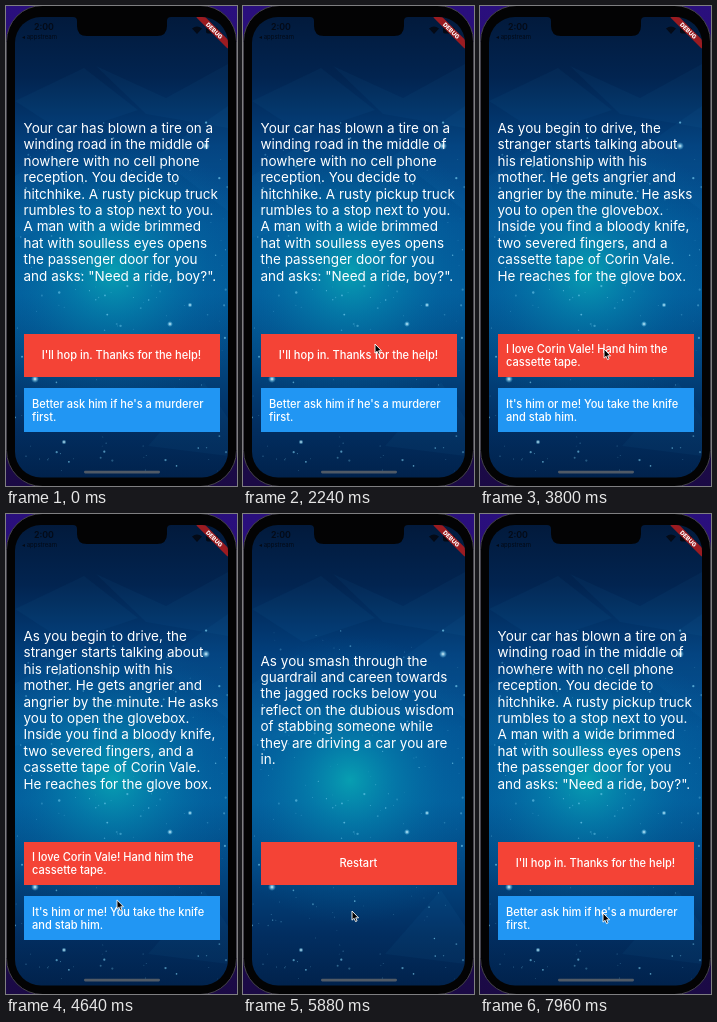
An HTML page that plays this animation: 231x480 px, repeating every 8 s.

```html
<!DOCTYPE html>
<html lang="en">
<head>
<meta charset="utf-8">
<title>Story game</title>
<style>
  html, body { margin: 0; width: 100%; height: 100%; overflow: hidden; background: #1b0a45; }
  #stage { position: relative; width: 231px; height: 480px; overflow: hidden; color: #fff;
    background: linear-gradient(#2a0f7d, #1b0a45); font-family: Inter, Roboto, sans-serif; }
  #stage > *, .scene > *, .button > * { position: absolute; }
  svg { left: 0; top: 0; display: block; }

  .scene { left: 0; top: 0; width: 231px; height: 480px; animation: 8s step-end infinite; }
  .story { left: 17.5px; top: 0; height: 392px; display: flex; align-items: center;
    font-size: 13.5px; line-height: 16.42px; letter-spacing: .02px; white-space: pre; }
  .label { left: 17px; width: 179px; height: 44px; padding: 0 9px; display: flex; align-items: center;
    font-size: 11.05px; font-weight: 500; line-height: 13px; white-space: pre; }
  .center { justify-content: center; }
  .label.first { top: 327.6px; }
  .label.second { top: 382.6px; }

  .button { left: 18px; width: 196px; overflow: hidden; }
  .red { top: 328px; height: 43px; background: #f44336; }
  .blue { top: 382px; height: 44px; background: #2196f3; animation: blue-button 8s step-end infinite; }
  .glow { inset: 0; background: #fff; opacity: 0; animation: 8s linear infinite; }
  .ripple { left: 102px; top: 3px; width: 24px; height: 24px; border-radius: 50%; background: #fff;
    opacity: 0; animation: ripple 8s linear infinite; }
  .red .glow { animation-name: red-glow; }
  .blue .glow { animation-name: blue-glow; }

  #opening { animation-name: opening; }
  #drive { animation-name: drive; }
  #ending { animation-name: ending; }
  #pointer { animation: move 8s ease-in-out infinite, show 8s step-end infinite; }

  @keyframes opening { 0% { visibility: visible } 31.5% { visibility: hidden } 87%, 100% { visibility: visible } }
  @keyframes drive { 0% { visibility: hidden } 31.5% { visibility: visible } 67%, 100% { visibility: hidden } }
  @keyframes ending { 0% { visibility: hidden } 67% { visibility: visible } 87%, 100% { visibility: hidden } }
  @keyframes blue-button { 0% { visibility: visible } 67% { visibility: hidden } 87%, 100% { visibility: visible } }
  @keyframes red-glow {
    0%, 30% { opacity: 0 } 31%, 31.5% { opacity: .08 } 34.5%, 84.5% { opacity: 0 }
    85.5%, 87% { opacity: .08 } 89.5%, 100% { opacity: 0 }
  }
  @keyframes blue-glow { 0%, 64.5% { opacity: 0 } 65.5%, 67% { opacity: .08 } 68%, 100% { opacity: 0 } }
  @keyframes ripple {
    0%, 30% { opacity: 0; transform: scale(.2) }
    31.5% { opacity: .1; transform: scale(1) }
    34.5% { opacity: 0; transform: scale(9) }
    34.6%, 84.5% { opacity: 0; transform: scale(.2) }
    86% { opacity: .1; transform: scale(1) }
    87% { opacity: .1; transform: scale(1.4) }
    89.5% { opacity: 0; transform: scale(9) }
    89.6%, 100% { opacity: 0; transform: scale(.2) }
  }
  @keyframes show { 0% { visibility: hidden } 19%, 100% { visibility: visible } }
  @keyframes move {
    0%, 19% { transform: translate(229px, 368px); animation-timing-function: ease-out }
    28%, 32% { transform: translate(130px, 337px) }
    38%, 51% { transform: translate(122px, 342px) }
    62%, 67.5% { transform: translate(104px, 401px) }
    72%, 75% { transform: translate(107px, 396px) }
    83%, 92% { transform: translate(131px, 342px) }
    99%, 100% { transform: translate(121px, 398px) }
  }
</style>
</head>
<body>
<div id="stage">
  <svg width="231" height="480" viewBox="0 0 231 480">
    <defs>
      <linearGradient id="night" x2="0" y2="1">
        <stop offset="0" stop-color="#021a3c"/>
        <stop offset=".13" stop-color="#022450"/>
        <stop offset=".28" stop-color="#023f7c"/>
        <stop offset=".45" stop-color="#035596"/>
        <stop offset=".6" stop-color="#035c9b"/>
        <stop offset=".75" stop-color="#024681"/>
        <stop offset=".88" stop-color="#022f62"/>
        <stop offset="1" stop-color="#01224c"/>
      </linearGradient>
      <radialGradient id="halo" gradientUnits="userSpaceOnUse" cx="107" cy="266" r="145">
        <stop offset="0" stop-color="#08a6b4" stop-opacity=".9"/>
        <stop offset=".3" stop-color="#058db2" stop-opacity=".58"/>
        <stop offset=".65" stop-color="#0474aa" stop-opacity=".25"/>
        <stop offset="1" stop-color="#0466a0" stop-opacity="0"/>
      </radialGradient>
      <radialGradient id="shine">
        <stop offset="0" stop-color="#fff"/>
        <stop offset=".25" stop-color="#b8ecff" stop-opacity=".8"/>
        <stop offset="1" stop-color="#5cc8f0" stop-opacity="0"/>
      </radialGradient>
      <clipPath id="screen"><rect x="9" y="11" width="213" height="460.5" rx="26"/></clipPath>
    </defs>

    <rect x=".5" y="-.5" width="230" height="481" rx="36" fill="#030304" stroke="#45434c"/>
    <g clip-path="url(#screen)">
      <path d="M9 11h213v461H9z" fill="url(#night)"/>
      <path d="M9 11h213v461H9z" fill="url(#halo)"/>
      <g fill="#2f95da" fill-opacity=".05">
        <path d="M9 95L78 62L132 104L60 128Z"/>
        <path d="M90 60L160 92L222 58V122L140 108Z"/>
        <path d="M150 150L222 100V205Z"/>
        <path d="M9 170L56 140L84 210L9 232Z"/>
        <path d="M142 440L198 376L222 412V450Z"/>
      </g>
      <g id="stars"></g>

      <path d="M67 11q4 0 4 4v5q0 10 10 10h70q10 0 10-10v-5q0-4 4-4z" fill="#030304"/>
      <g fill="#040a16" font-family="Inter, sans-serif">
        <text x="28" y="24" font-size="8.8" font-weight="600">2:00</text>
        <text x="16" y="33" font-size="6">◂ appstream</text>
        <path d="M186 22.5q5-4 10 0l-5 5.5z"/>
        <rect x="200" y="21.5" width="12" height="6" rx="1.8"/>
      </g>
      <g transform="translate(208.3 24.7) rotate(45)">
        <path d="M-22-3.3h44v6.6h-44z" fill="#b71c1c" fill-opacity=".85"/>
        <text y="2.1" text-anchor="middle" font-size="5.9" font-weight="800" fill="#fff" font-family="Inter, sans-serif">DEBUG</text>
      </g>
      <rect x="78" y="464.8" width="76" height="2.6" rx="1.3" fill="#505a66"/>
    </g>
  </svg>

  <div class="button red"><div class="glow"></div><div class="ripple"></div></div>
  <div class="button blue"><div class="glow"></div></div>

  <div class="scene" id="opening">
    <div class="story">Your car has blown a tire on a
winding road in the middle of
nowhere with no cell phone
reception. You decide to
hitchhike. A rusty pickup truck
rumbles to a stop next to you.
A man with a wide brimmed
hat with soulless eyes opens
the passenger door for you
and asks: "Need a ride, boy?".</div>
    <div class="label first center">I'll hop in. Thanks for the help!</div>
    <div class="label second">Better ask him if he's a murderer
first.</div>
  </div>

  <div class="scene" id="drive">
    <div class="story">As you begin to drive, the
stranger starts talking about
his relationship with his
mother. He gets angrier and
angrier by the minute. He asks
you to open the glovebox.
Inside you find a bloody knife,
two severed fingers, and a
cassette tape of Corin Vale.
He reaches for the glove box.</div>
    <div class="label first">I love Corin Vale! Hand him the
cassette tape.</div>
    <div class="label second">It's him or me! You take the knife
and stab him.</div>
  </div>

  <div class="scene" id="ending">
    <div class="story">As you smash through the
guardrail and careen towards
the jagged rocks below you
reflect on the dubious wisdom
of stabbing someone while
they are driving a car you are
in.</div>
    <div class="label first center">Restart</div>
  </div>

  <svg id="pointer" width="11" height="14" viewBox="-2 -1 11 14">
    <path d="M0 0V9.2L2.1 7.3L3.5 10.6L5.1 9.9L3.7 6.8H6.6Z" fill="#000" stroke="#fff" stroke-width=".9"/>
  </svg>
</div>

<script>
  const stars = document.getElementById('stars');

  function addStar(x, y, r, fill, opacity) {
    const star = document.createElementNS('http://www.w3.org/2000/svg', 'circle');
    const attributes = { cx: x, cy: y, r, fill, opacity };
    for (const name in attributes) star.setAttribute(name, attributes[name]);
    stars.append(star);
  }

  let seed = 17;
  const random = () => (seed = seed * 16807 % 2147483647) / 2147483647;

  for (let i = 0; i < 190; i++) {
    const x = 9 + random() * 213;
    const y = 465 - 350 * random() ** 1.3;
    addStar(x, y, .35 + .9 * random() ** 3, '#7fd4f5', .25 + random() * .45);
  }
  for (const [x, y, r] of [[200, 140, 4], [29, 373, 4], [164, 318, 3], [184, 299, 2.5], [58, 436, 2.5]])
    addStar(x, y, r, 'url(#shine)', .95);
</script>
</body>
</html>
```
